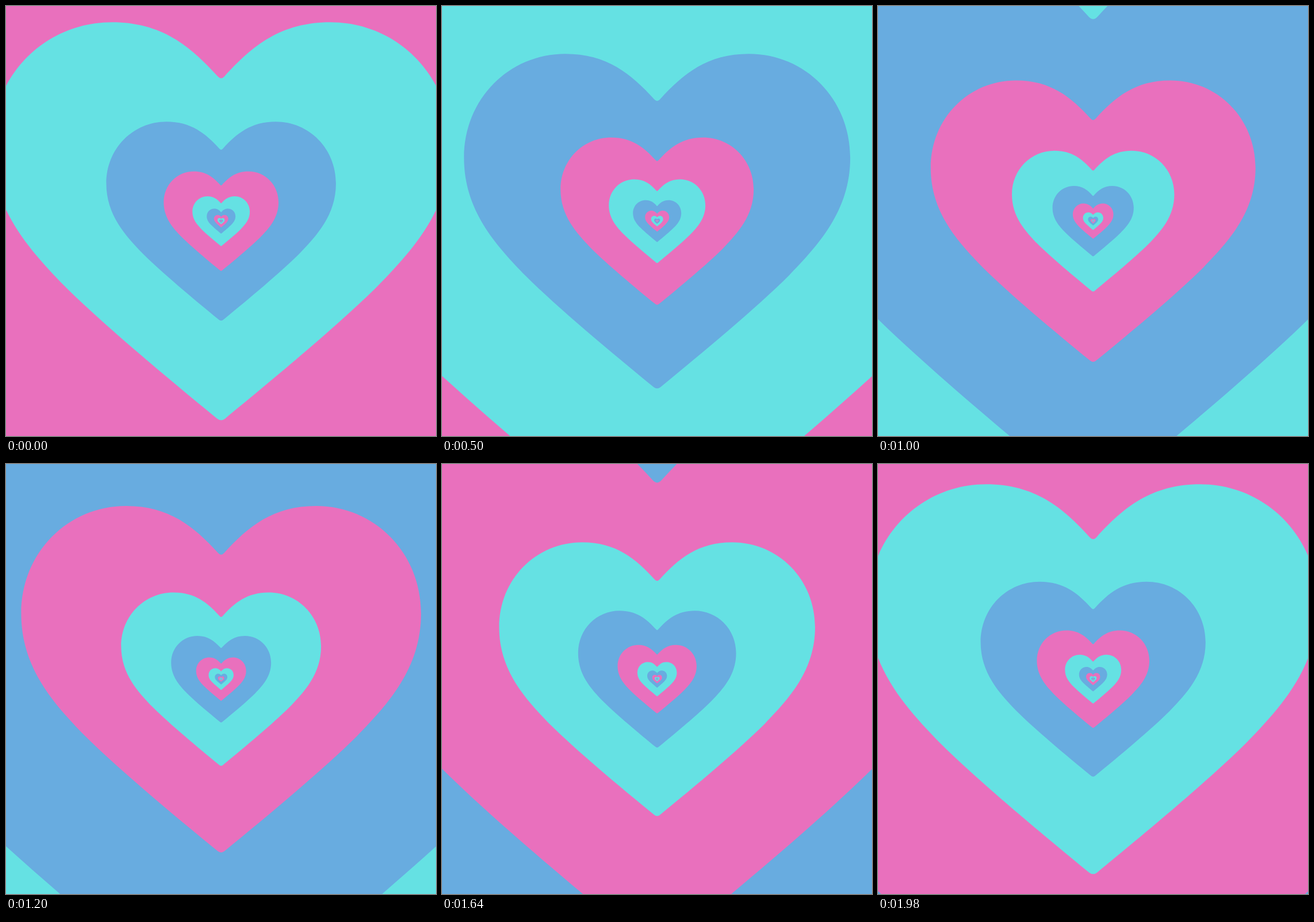
An HTML page with a canvas for the animation above (2000 ms loop, 748 px wide and 748 px high).

```html
<!DOCTYPE html>
<html lang="en">
<head>
<meta charset="utf-8">
<title>Endless hearts</title>
<style>
  html, body { margin: 0; width: 100%; height: 100%; overflow: hidden; background: #e970bd; }
  canvas { display: block; width: 748px; height: 748px; }
</style>
</head>
<body>
<canvas id="stage" width="748" height="748"></canvas>
<script>
const SIZE = 748, CENTER = 374.2;
const LOOP = 2000, STEP = 20;
const COLORS = ["#65e1e3", "#68ace0", "#e970bd"]; // from outside to inside
const ctx = document.getElementById("stage").getContext("2d");

// Heart around the origin, at the size of scale 1
const heart = new Path2D(`
  M0 -248.5 Q-3 -248.5 -6 -252
  C-54 -305 -104 -346 -190 -346
  C-306 -346 -399.5 -253 -399.5 -131
  C-399.5 -22 -333.9 49.5 -271.9 113.4
  C-207 178 -95 271.5 -7 343.5
  Q0 349 7 343.5
  C95 271.5 207 178 271.9 113.4
  C333.9 49.5 399.5 -22 399.5 -131
  C399.5 -253 306 -346 190 -346
  C104 -346 54 -305 6 -252
  Q3 -248.5 0 -248.5 Z`);

function draw(time) {
  // Every heart doubles in size three times per loop
  const phase = time / LOOP * 3;
  const first = Math.floor(phase) - 2;
  for (let k = first; k < first + 13; k++) {
    const scale = 2 ** (phase - k);
    ctx.setTransform(scale, 0, 0, scale, CENTER, CENTER);
    ctx.fillStyle = COLORS[(k + 3) % 3];
    ctx.fill(heart);
  }
}

let start;
function tick(now) {
  start ??= now;
  const time = (now - start) % LOOP;
  draw(Math.floor(time / STEP + 0.001) * STEP);
  requestAnimationFrame(tick);
}
draw(0);
requestAnimationFrame(tick);
</script>
</body>
</html>
```
